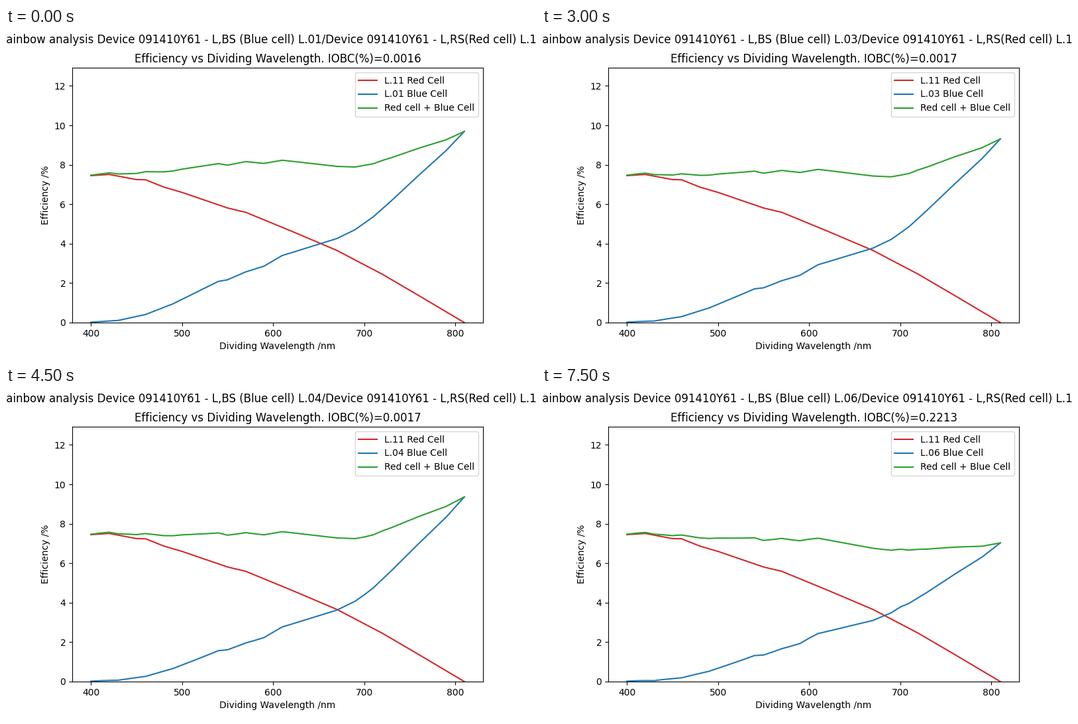
Animation, 800 px wide and 500 px high, one loop 8000 ms. Source, as a matplotlib script:

```python
import numpy as np
import matplotlib.pyplot as plt
from matplotlib.animation import FuncAnimation

INTERVAL = 500          # ms per frame
FRAMES = 16             # one loop of 8000 ms
HOLD = 3                # frames each device stays on screen

wavelength = np.arange(400, 811, 10)


def through(*points):
    """Curve sampled at every wavelength from a few (nm, %) key points."""
    return np.interp(wavelength, *zip(*points))


red = through((400, 7.45), (420, 7.51), (450, 7.25), (460, 7.24), (480, 6.87),
              (500, 6.60), (550, 5.81), (570, 5.59), (620, 4.64), (670, 3.66),
              (720, 2.45), (760, 1.37), (810, 0))

blue_first = through((400, 0.02), (430, 0.11), (460, 0.41), (490, 0.95),
                     (540, 2.09), (550, 2.17), (570, 2.57), (590, 2.86),
                     (610, 3.40), (620, 3.54), (670, 4.26), (690, 4.71),
                     (710, 5.36), (730, 6.18), (760, 7.47), (790, 8.72),
                     (810, 9.69))

# Each device: its IOBC and its blue loss at 600, 700 and 810 nm
devices = [
    (0.0016, (0, 0, 0)),
    (0.0016, (0.18, 0.17, 0.16)),
    (0.0017, (0.46, 0.50, 0.38)),
    (0.0017, (0.63, 0.64, 0.33)),
    (0.0017, (0.71, 0.69, 0.33)),
    (0.2213, (0.93, 1.26, 2.66)),
]


def blue_curve(loss):
    u = np.clip((wavelength - 400) / 190, 0, 1)
    onset = u * u * (3 - 2 * u)
    drop = onset * np.interp(wavelength, (600, 700, 810), loss)
    return np.maximum(blue_first - drop, 0)


plt.rcParams["font.family"] = "DejaVu Sans"
fig, ax = plt.subplots(figsize=(8, 5), dpi=100)
ax.plot(wavelength, red, color="tab:red", label="L.11 Red Cell")
blue_line, = ax.plot(wavelength, blue_first, color="tab:blue",
                     label="L.01 Blue Cell")
sum_line, = ax.plot(wavelength, red + blue_first, color="tab:green",
                    label="Red cell + Blue Cell")
ax.set_xlim(379.5, 830.5)
ax.set_ylim(0, 12.92)
ax.set_xlabel("Dividing Wavelength /nm")
ax.set_ylabel("Efficiency /%")
legend = ax.legend(loc="upper right")
heading = fig.suptitle("", y=0.982)
title = ax.set_title("")


def update(frame):
    cell = frame // HOLD
    iobc, loss = devices[cell]
    name = f"L.{cell + 1:02d}"
    blue = blue_curve(loss)
    blue_line.set_ydata(blue)
    sum_line.set_ydata(red + blue)
    legend.get_texts()[1].set_text(f"{name} Blue Cell")
    heading.set_text(f"Rainbow analysis Device 091410Y61 - L,BS (Blue cell) {name}"
                     "/Device 091410Y61 - L,RS(Red cell) L.11")
    title.set_text(f"Efficiency vs Dividing Wavelength. IOBC(%)={iobc:.4f}")
    return blue_line, sum_line, heading, title


anim = FuncAnimation(fig, update, frames=FRAMES, interval=INTERVAL,
                     repeat=True, repeat_delay=0, blit=False)
plt.show()
```
